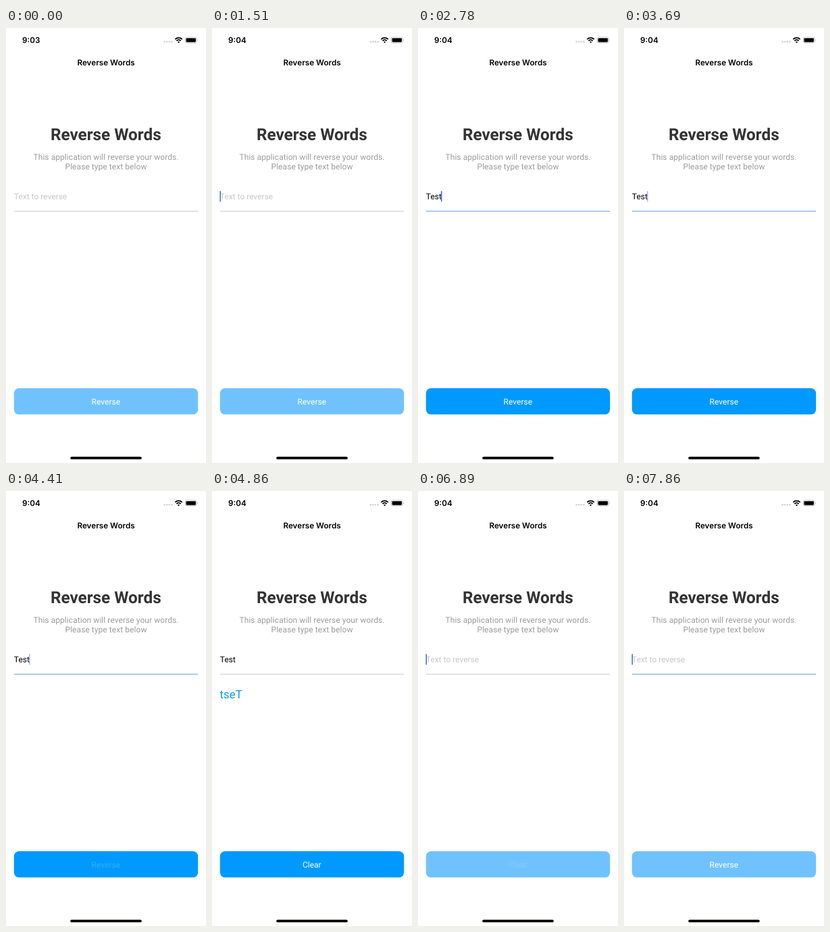
These frames come from a looping animation (296x640 px, 8000 ms). An HTML page:

```html
<!DOCTYPE html>
<html lang="en">
<head>
<meta charset="utf-8">
<title>Reverse Words</title>
<style>
  html, body { margin: 0; width: 100%; height: 100%; overflow: hidden; background: #fff; }
  svg { display: block; width: 100vw; height: 100vh; }
  text { font: 12px Roboto, sans-serif; white-space: pre; text-rendering: geometricPrecision; }
  .mid { text-anchor: middle; }
  .bar { font: 600 11.7px Inter, sans-serif; }
  .title { font-size: 24.3px; font-weight: 700; fill: #333; }
  .hint { fill: #9b9b9b; letter-spacing: .06px; }
  #placeholder { fill: #c7c7c9; }
  #result { font-size: 16.9px; fill: #0a98f7; }
  #label { fill: #fff; }
</style>
</head>
<body>
<svg viewBox="0 0 296 640">
  <text id="clock" class="bar" x="24" y="22"></text>
  <g fill="#d2d2d2">
    <circle cx="234.6" cy="20.3" r="1.3"/><circle cx="238.2" cy="20.3" r="1.3"/>
    <circle cx="241.8" cy="20.3" r="1.3"/><circle cx="245.4" cy="20.3" r="1.3"/>
  </g>
  <g fill="none" stroke="#000" stroke-width="1.8">
    <path d="M250.3 16.6a7.4 7.4 0 0 1 10.4 0M252.4 18.8a4.4 4.4 0 0 1 6.2 0"/>
    <path d="M255.5 22.2l-1.6-1.7a2.3 2.3 0 0 1 3.2 0z" fill="#000" stroke="none"/>
  </g>
  <rect x="265.3" y="13.8" width="16.8" height="8.1" rx="2.3" fill="none" stroke="#a6a6a6" stroke-width=".8"/>
  <rect x="266.5" y="15" width="14.4" height="5.7" rx="1.1"/>
  <path d="M283.2 16.3q1.2 1.5 0 3z" fill="#a6a6a6"/>

  <text class="bar mid" x="148" y="54.5">Reverse Words</text>
  <text class="title mid" x="147.8" y="165">Reverse Words</text>
  <text class="hint mid" x="148" y="194.2">This application will reverse your words.</text>
  <text class="hint mid" x="148" y="208.2">Please type text below</text>

  <text id="placeholder" x="11.8" y="252"></text>
  <text id="input" x="11.8" y="252"></text>
  <rect id="cursor" y="240" width="1.6" height="15.6" fill="#426bf2"/>
  <rect id="line" x="11.8" y="269" width="272.4" height="1"/>
  <text id="result" x="11.5" y="305.3"></text>

  <rect id="button" x="11.8" y="530" width="272.4" height="38.6" rx="7.5"/>
  <text id="label" class="mid" x="147.8" y="553.7"></text>
  <rect x="95.2" y="630.8" width="105.6" height="3.7" rx="1.85"/>
</svg>
<script>
const DURATION = 8000;
const GREY = '#cdcdcd', FADING = '#a3b5d8', BLUE = '#6f9fee';
const el = id => document.getElementById(id);

// Each entry lists only what changes at its time.
const steps = [
  [0, { clock: '9:03', text: '', cursor: 0, line: GREY, result: '', label: 'Reverse', labelAlpha: 1 }],
  [500, { cursor: 1 }],
  [1030, { clock: '9:04', cursor: .5 }],
  [1150, { cursor: 0 }],
  [1390, { cursor: .5 }],
  [1510, { cursor: 1 }],
  [1750, { text: 'T' }],
  [1850, { line: FADING }],
  [1970, { line: BLUE }],
  [2090, { text: 'Te' }],
  [2340, { text: 'Tes' }],
  [2780, { text: 'Test' }],
  [3400, { cursor: .4 }],
  [3540, { cursor: 0 }],
  [3690, { cursor: .5 }],
  [3810, { cursor: 1 }],
  [4410, { cursor: .5, labelAlpha: .2 }],
  [4520, { cursor: 0, result: 'tseT', label: 'Clear', line: FADING }],
  [4640, { labelAlpha: .5, line: GREY }],
  [4750, { labelAlpha: .85 }],
  [4860, { labelAlpha: 1 }],
  [6650, { labelAlpha: .2 }],
  [6890, { text: '', result: '', cursor: 1, labelAlpha: .1 }],
  [7000, { label: 'Reverse', labelAlpha: .4, line: FADING }],
  [7100, { labelAlpha: .8, line: BLUE }],
  [7200, { labelAlpha: 1 }],
  [7420, { cursor: .5 }],
  [7540, { cursor: 0 }],
  [7740, { cursor: .5 }],
  [7860, { cursor: 1 }],
];

function draw(time) {
  const state = Object.assign({}, ...steps.filter(([at]) => at <= time).map(step => step[1]));
  el('clock').textContent = state.clock;
  el('input').textContent = state.text;
  el('placeholder').textContent = state.text ? '' : 'Text to reverse';
  el('cursor').setAttribute('x', 11.5 + (state.text ? el('input').getComputedTextLength() - .6 : 0));
  el('cursor').style.opacity = state.cursor;
  el('line').style.fill = state.line;
  el('result').textContent = state.result;
  el('button').style.fill = state.text ? '#0099ff' : '#70c2ff';
  el('label').textContent = state.label;
  el('label').style.opacity = state.labelAlpha;
}

const start = performance.now();
function frame() {
  draw((performance.now() - start) % DURATION);
  requestAnimationFrame(frame);
}
frame();
</script>
</body>
</html>
```
